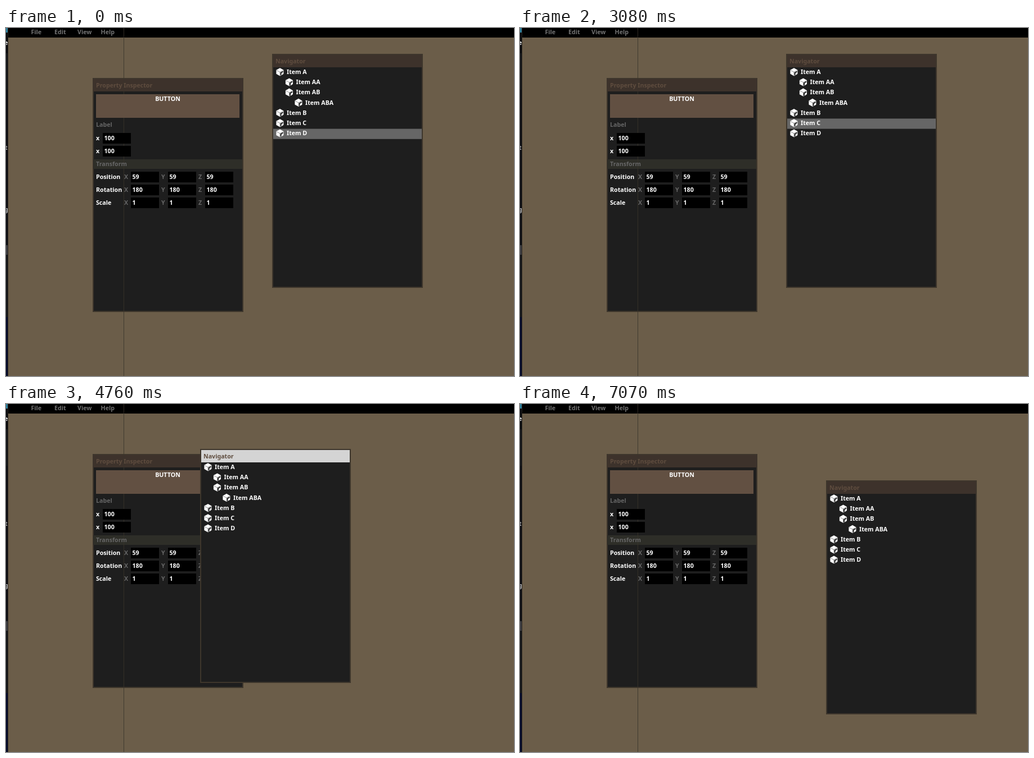
Recreate the animation shown at these times as an HTML page. Size 903x620 px, loop 7140 ms.

```html
<!DOCTYPE html>
<html lang="en">
<head>
<meta charset="utf-8">
<title>Panels</title>
<style>
  html, body { margin: 0; width: 100%; height: 100%; overflow: hidden; background: #6b5d49; }
  svg { display: block; width: 903px; height: 620px; }
  text { font: bold 10.67px "Noto Sans", "Open Sans", sans-serif; fill: #fff; white-space: pre; }
  .dim { fill: #666; }
  .menu { fill: #727272; }
  .title { fill: #5f4d3f; }
  .frame { fill: #3e362c; }
  .body { fill: #1e1e1e; }
  .head { fill: #3d322b; }
</style>
</head>
<body>
<svg viewBox="0 0 903 620">
  <defs>
    <g id="cube">
      <path d="M7 0L13.4 3.6V10.6L7 14.2L.4 10.6V3.6Z" fill="#fff"/>
      <path d="M1 4.2L7 7.4L12.6 4.4M7 7.4V13.6" fill="none" stroke="#1e1e1e" stroke-width=".9" opacity=".55"/>
      <path d="M7.6 8L12.6 5.2V7.2L9.6 9.2V12.4L7.6 13.4Z" fill="#1e1e1e"/>
      <path d="M9.8 12.6Q9.4 9.2 13 7.6Q13.8 11 9.8 12.6Z" fill="#fff"/>
    </g>
    <g id="panel">
      <rect class="frame" width="268" height="417"/>
      <rect class="body" x="2" y="2" width="264" height="413"/>
    </g>
  </defs>

  <rect width="903" height="620" fill="#6b5d49"/>
  <rect width="903" height="17" fill="#000"/>

  <!-- sliver of the window behind -->
  <rect width="4" height="620" fill="#141519"/>
  <rect width="3" height="8" fill="#2d7f9c"/>
  <rect y="9" width="3" height="36" fill="#08090d"/>
  <rect y="110" width="3" height="276" fill="#0d0e13"/>
  <rect y="387" width="3" height="17" fill="#3c3c40"/>
  <rect y="515" width="3" height="105" fill="#050a2a"/>
  <text x="-3" y="30">e</text>
  <text x="-2" y="217" fill-opacity=".7">t</text>
  <text x="-3" y="327" fill-opacity=".7">g</text>
  <rect x="3" width="1" height="620" fill="#2b261f"/>

  <text class="menu" x="44.500" y="11">File</text>
  <text class="menu" x="86" y="11">Edit</text>
  <text class="menu" x="127" y="11">View</text>
  <text class="menu" x="168.500" y="11">Help</text>

  <g id="inspector">
    <use href="#panel" x="154" y="89"/>
    <rect class="head" x="155" y="91" width="266" height="22"/>
    <rect x="155" y="234" width="265" height="17" fill="#2e2e28"/>
    <rect x="209" width="1" height="620" fill="#3a342b" opacity=".85"/>
    <text class="title" x="160" y="106">Property Inspector</text>
    <rect id="button" x="160" y="118" width="255" height="42" fill="#625042"/>
    <text x="287.500" y="130" text-anchor="middle">BUTTON</text>
    <text class="dim" x="160" y="176">Label</text>
    <text class="dim" x="160" y="246">Transform</text>
  </g>

  <g id="nav">
    <use href="#panel"/>
    <rect id="head" class="head" x="2" y="2" width="264" height="22"/>
    <text class="title" x="6" y="17">Navigator</text>
    <rect id="bar" x="2" width="264" height="18.2" fill="#666"/>
  </g>
</svg>

<script>
const LOOP = 7140, STEP = 70, ROW = 18.2, ROWS_TOP = 24.4;
const $ = id => document.getElementById(id);

function add(parent, tag, attrs, content = '') {
  const el = document.createElementNS('http://www.w3.org/2000/svg', tag);
  for (const key in attrs) el.setAttribute(key, attrs[key]);
  el.textContent = content;
  parent.append(el);
}

function field(x, y, value) {
  add($('inspector'), 'rect', { x, y: y - 9, width: 50, height: 19 });
  add($('inspector'), 'text', { x: x + 2.5, y: y + 4 }, value);
}

for (const y of [196, 219]) {
  add($('inspector'), 'text', { x: 160, y: y + 4 }, 'x');
  field(172, y, 100);
}
[['Position', 59], ['Rotation', 180], ['Scale', 1]].forEach(([name, value], i) => {
  const y = 265 + 23 * i;
  add($('inspector'), 'text', { x: 160, y: y + 4 }, name);
  [...'XYZ'].forEach((axis, j) => {
    add($('inspector'), 'text', { x: 210 + 66 * j, y: y + 4, class: 'dim' }, axis);
    field(222 + 66 * j, y, value);
  });
});

const items = [['A', 0], ['AA', 1], ['AB', 1], ['ABA', 2], ['B', 0], ['C', 0], ['D', 0]];
items.forEach(([name, depth], i) => {
  const x = 7 + 16.5 * depth, y = ROWS_TOP + ROW * i;
  add($('nav'), 'use', { href: '#cube', x, y: y + .8 });
  add($('nav'), 'text', { x: x + 19, y: y + 11.6 }, 'Item ' + name);
});

// What the pointer is over: [ms, target]
const hover = [
  [0, 'D'], [70, 'head'], [140, ''], [490, 'head'], [1540, 'ABA'], [1680, 'B'], [1750, ''],
  [1820, 'button'], [1960, 'press'], [2100, 'button'], [2310, 'press'], [2450, 'button'],
  [2660, ''], [2940, 'D'], [3080, 'C'], [3360, 'B'], [3430, 'ABA'], [3500, 'AB'],
  [3570, 'AA'], [3710, 'A'], [3850, 'head'], [5460, ''], [5530, 'A'], [5600, 'AB'],
  [5670, 'B'], [5740, 'C'], [6020, 'D'], [6090, '']
];
const buttonFill = { button: '#7a6453', press: '#3d322b' };

// Navigator corner while dragged, one point per step
const dragStart = 4130;
const path = [
  [473, 46], [469, 43], [455, 37], [430, 35], [404, 37], [380, 41], [359, 48], [344, 57],
  [336, 68], [345, 80], [367, 101], [396, 126], [430, 149], [465, 166], [499, 175],
  [525, 167], [540, 150], [544, 136]
];

function draw(now) {
  const t = now % LOOP;
  const over = hover.findLast(([ms]) => ms <= t)[1];
  const n = Math.floor((t - dragStart) / STEP);
  const [x, y] = path[Math.max(0, Math.min(path.length - 1, n))];
  const row = items.findIndex(([name]) => name === over);

  $('nav').setAttribute('transform', `translate(${x} ${y})`);
  $('head').style.fill = over === 'head' ? '#d4d4d4' : '';
  $('button').setAttribute('fill', buttonFill[over] || '#625042');
  $('bar').setAttribute('y', ROWS_TOP + ROW * row);
  $('bar').setAttribute('visibility', row < 0 ? 'hidden' : 'visible');
}

const start = performance.now();
function tick() {
  draw(performance.now() - start);
  requestAnimationFrame(tick);
}
tick();
</script>
</body>
</html>
```
